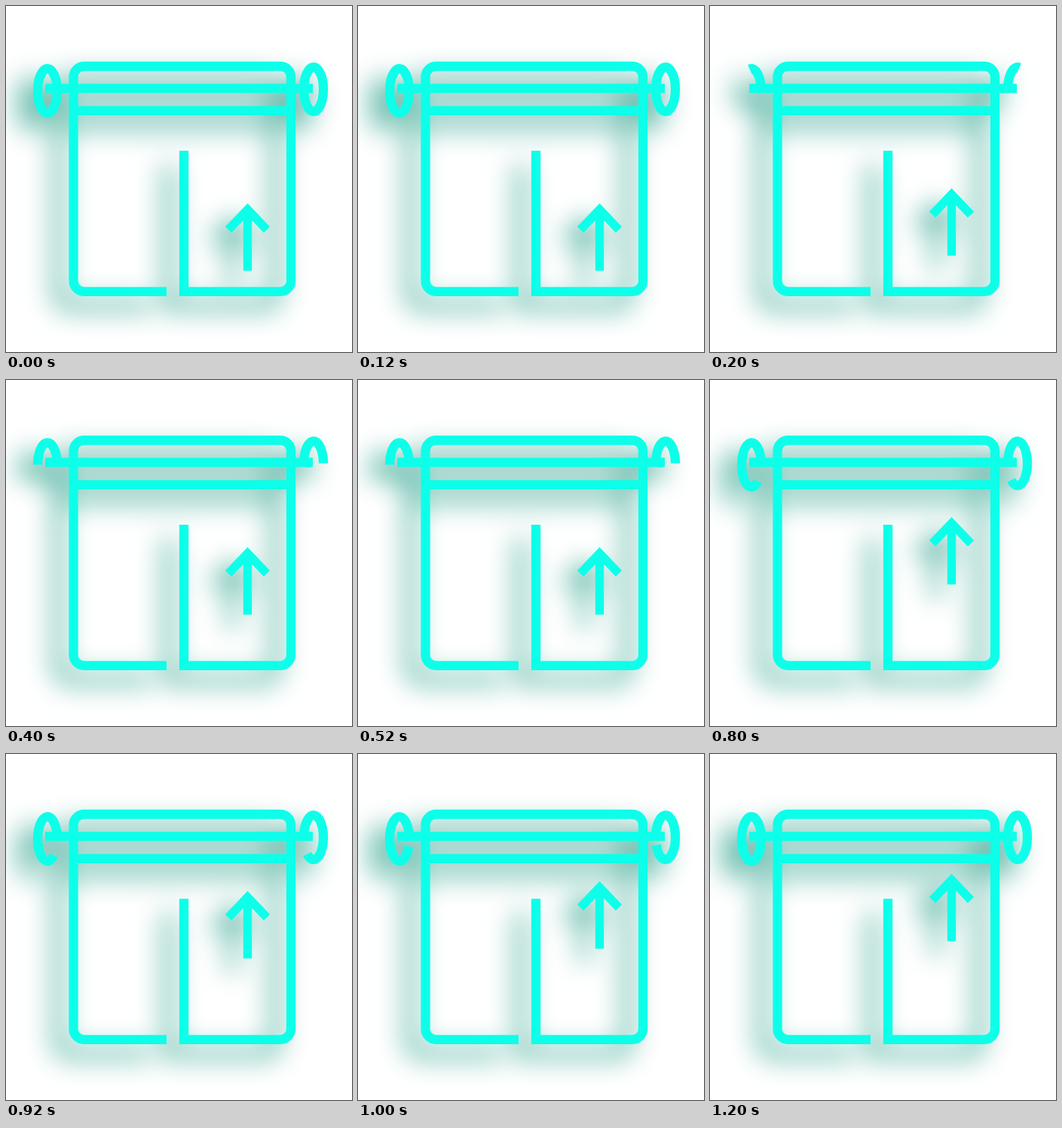
Recreate the animation shown at these times as an HTML page. Size 459x459 px, loop 1400 ms.

```html
<!DOCTYPE html>
<html lang="en">
<head>
<meta charset="utf-8">
<title>Roller blind</title>
<style>
html, body { margin: 0; width: 100%; height: 100%; overflow: hidden; background: #fff; }
svg { display: block; width: 100vw; height: 100vh; }
</style>
</head>
<body>
<svg viewBox="0 0 459 459">
  <defs>
    <filter id="shadow" filterUnits="userSpaceOnUse" x="-80" y="-80" width="620" height="620" color-interpolation-filters="sRGB">
      <feDropShadow dx="-20" dy="18" stdDeviation="17.5" flood-color="rgb(58,168,148)"/>
    </filter>
  </defs>
  <g filter="url(#shadow)" fill="none" stroke="#0dffe9" stroke-width="12.3" stroke-miterlimit="10">
    <path d="M213 378.8H103.5a14 14 0 0 1-14-14V94a14 14 0 0 1 14-14H364a14 14 0 0 1 14 14V364.8a14 14 0 0 1-14 14H230"/>
    <path d="M236 192V384.9M89.5 138.9H378M52 109.3H407"/>
    <path id="left"/>
    <path id="right"/>
    <g id="arrow" stroke-width="11.4">
      <path d="M295 296.7L320.5 270L346 296.7M320.5 270V351.3"/>
    </g>
  </g>
</svg>
<script>
const STEP = 200, LOOP = 1400;
const sweep = [360, 101, 180, 247, 311, 340, 360]; // degrees of ring drawn
const $ = id => document.getElementById(id);

// Arc from the inner side of a ring, over the top; side mirrors it
function ring(cx, cy, side, degrees) {
  const rx = 13, ry = 29.4;
  const a = Math.min(degrees, 359.99) * Math.PI / 180;
  const x = cx + side * rx * Math.cos(a), y = cy - ry * Math.sin(a);
  const large = degrees > 180 ? 1 : 0, turn = side > 0 ? 0 : 1;
  return `M${cx + side * rx} ${cy}A${rx} ${ry} 0 ${large} ${turn} ${x} ${y}`;
}

// Even rise that slows down near the top
function rise(step) {
  return step <= 4 ? 20 * step : 80 + 13 * (step - 4) - 3 * (step - 5) * (step - 4) / 2;
}

function draw(time) {
  const step = Math.floor((time % LOOP) / STEP);
  $("left").setAttribute("d", ring(55, 112.6, 1, sweep[step]));
  $("right").setAttribute("d", ring(408, 110.6, -1, sweep[step]));
  $("arrow").setAttribute("transform", `translate(0 ${-rise(step)})`);
}

let start;
function tick(now) {
  start ??= now;
  draw(now - start);
  requestAnimationFrame(tick);
}
draw(0);
requestAnimationFrame(tick);
</script>
</body>
</html>
```
